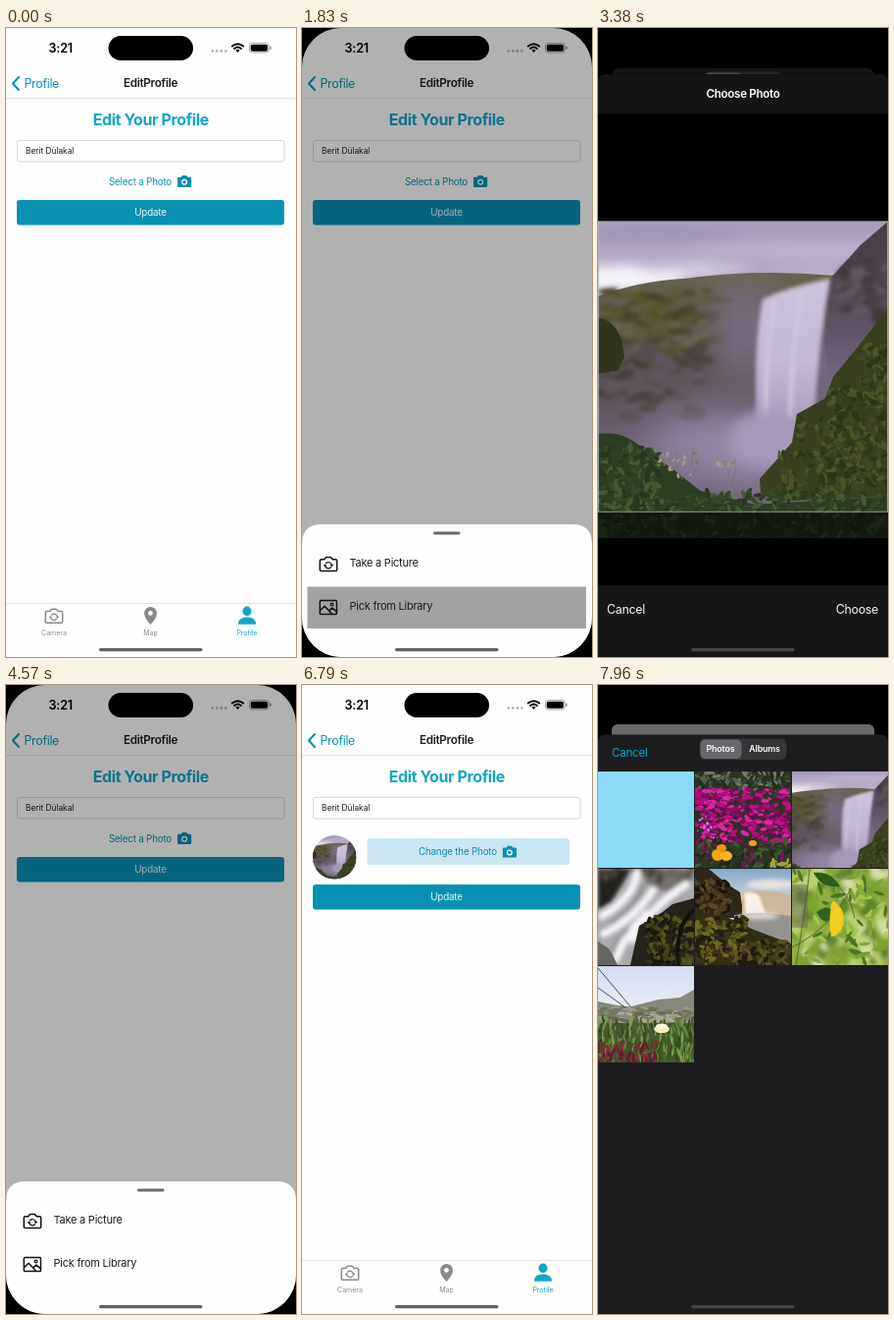
Write an HTML page that moves like this. It is 296 px wide and 640 px high and loops after 8 s.

```html
<!DOCTYPE html>
<html lang="en">
<head>
<meta charset="utf-8">
<title>Edit profile</title>
<style>
html, body { margin: 0; width: 100%; height: 100%; overflow: hidden; background: #000; }
svg { display: block; }
#stage { width: 100vw; height: 100vh; }
text { font-family: Inter, Roboto, sans-serif; white-space: pre; }
</style>
</head>
<body>
<svg id="stage" viewBox="0 0 296 640"></svg>
<script>
const W = 296, H = 640, LOOP = 8000;
const CYAN = '#0891b2', BRIGHT = '#11a6c6';
const $ = id => document.getElementById(id);

// Drawing helpers
const rect = (x, y, w, h, fill, r = 0, more = '') =>
  `<rect x="${x}" y="${y}" width="${w}" height="${h}" rx="${r}" fill="${fill}" ${more}/>`;
const path = (d, fill, more = '') => `<path d="${d}" fill="${fill}" ${more}/>`;
const line = (d, stroke, w = 1) =>
  path(d, 'none', `stroke="${stroke}" stroke-width="${w}" stroke-linecap="round" stroke-linejoin="round"`);
const oval = (x, y, rx, ry, fill, more = '') =>
  `<ellipse cx="${x}" cy="${y}" rx="${rx}" ry="${ry}" fill="${fill}" ${more}/>`;
const text = (s, x, y, size, fill, { weight = 400, ls = -0.2, anchor = 'start' } = {}) =>
  `<text x="${x}" y="${y}" font-size="${size}" fill="${fill}" font-weight="${weight}" letter-spacing="${ls}" text-anchor="${anchor}">${s}</text>`;
const mid = (s, x, y, size, fill, weight = 400, ls = -0.2) =>
  text(s, x, y, size, fill, { weight, ls, anchor: 'middle' });
const at = (x, y, body) => `<g transform="translate(${x} ${y})">${body}</g>`;
const blur = (n, body) => `<g filter="url(#blur${n})">${body}</g>`;
const blurDef = n => `<filter id="blur${n}" x="-50%" y="-50%" width="200%" height="200%"><feGaussianBlur stdDeviation="${n}"/></filter>`;
const grad = (id, stops) => `<linearGradient id="${id}" x2="0" y2="1">${stops.map((c, i) =>
  `<stop offset="${i / (stops.length - 1)}" stop-color="${c}"/>`).join('')}</linearGradient>`;

// Scattered ellipses from a seed, used for foliage and flowers
function scatter(seed, n, [x, y, w, h], colors, rx, ry, tilt = 180) {
  let s = seed;
  const rnd = () => (s = (s * 16807) % 2147483647) / 2147483647;
  rnd();
  let out = '';
  for (let i = 0; i < n; i++) {
    const px = (x + rnd() * w).toFixed(1), py = (y + rnd() * h).toFixed(1), k = 0.5 + rnd() * 0.8;
    const turn = `transform="rotate(${((rnd() - 0.5) * tilt).toFixed(0)} ${px} ${py})"`;
    out += oval(px, py, (rx * k).toFixed(1), (ry * k).toFixed(1), colors[i % colors.length], turn);
  }
  return out;
}

// Icons
const camera = (x, y, fill) => at(x, y,
  path('M1.2 2H3.8L5 .3H9.2L10.4 2H13a1.2 1.2 0 0 1 1.2 1.2V11a1.2 1.2 0 0 1-1.2 1.2H1.2A1.2 1.2 0 0 1 0 11V3.2A1.2 1.2 0 0 1 1.2 2z', fill) +
  oval(7.1, 7, 3, 3, '#fff') + oval(7.1, 7, 1.7, 1.7, fill));
const flipCamera = (x, y, c) => at(x, y,
  line('M2.2 3H5.2L6.6 1.2Q7 .8 7.6 .8H11.4Q12 .8 12.4 1.2L13.8 3H16.8Q18.2 3 18.2 4.4V13.4Q18.2 14.8 16.8 14.8H2.2Q.8 14.8 .8 13.4V4.4Q.8 3 2.2 3z', c, 1.5) +
  line('M7 6.8A3.6 3.6 0 0 1 13 8.6M12 11A3.6 3.6 0 0 1 6 9.2', c, 1.3) +
  path('M11.2 8.2H14.8L13 10.4zM4.2 9.6H7.8L6 7.4z', c));
const imageIcon = (x, y, c) => at(x, y,
  line('M2 .8H16.8Q18 .8 18 2V13.6Q18 14.8 16.8 14.8H2Q.8 14.8 .8 13.6V2Q.8 .8 2 .8zM1 10.8L5.6 6.4L13.2 14.4M10 11L13.4 8.4L17.8 12', c, 1.5) +
  `<circle cx="13" cy="4.8" r="1.4" fill="none" stroke="${c}" stroke-width="1.2"/>`);

// Photos
const moss = ['#3d4522', '#2c351a', '#4b5429', '#353c1f'];
const grass = ['#34482a', '#263620', '#425a33', '#2d4024'];
const fall = rect(0, 0, 296, 322, 'url(#sky)') +
  blur(6, oval(60, 14, 90, 6, '#9f93b3') + oval(200, 30, 110, 7, '#beb2cd') +
    oval(25, 58, 62, 13, '#f6f4fa') + oval(100, 50, 60, 6, '#ded7e8')) +
  path('M0 76Q40 61 90 58Q160 48 240 55L296 90V322H0z', 'url(#hill)') +
  blur(2, scatter(5, 150, [0, 70, 130, 75], ['#57572f', '#45442b', '#62583f', '#4d4336', '#6b6350'], 10, 3, 50) +
    scatter(7, 60, [0, 130, 110, 70], ['#4a4340', '#57504f', '#433f37', '#5f5560'], 10, 4, 50)) +
  blur(20, oval(150, 110, 30, 50, '#80708a') + oval(120, 226, 75, 32, '#9384a2') + oval(165, 235, 50, 30, '#9c8cae') +
    oval(240, 150, 25, 50, '#7f6f8c')) +
  path('M237 58L268 24L296 0V105L262 132L236 160Q226 110 237 58z', 'url(#slope)') +
  blur(2, scatter(9, 45, [246, 40, 50, 60], ['#4c4147', '#62555f', '#413a3b'], 8, 3, 80) +
    path('M168 79Q196 66 237 58Q226 120 222 185L210 220Q185 240 162 214Q158 130 168 79z', 'url(#water)') +
    line('M180 84Q171 140 171 200M208 72Q198 130 196 200', '#d5cbe1', 3)) +
  blur(6, oval(172, 222, 38, 28, '#a797b8')) +
  path('M296 88L265 128L240 158L232 180L203 196L198 225L165 262L166 276L180 285L296 280z', '#38401f') +
  scatter(11, 260, [236, 170, 60, 100], moss, 5, 2.4) +
  scatter(12, 70, [266, 125, 30, 60], moss, 5, 2.4) +
  scatter(13, 110, [184, 235, 70, 45], moss, 5, 2.4) +
  scatter(14, 50, [206, 200, 40, 35], moss, 4, 2) +
  path('M0 98Q24 102 27 138L20 152L0 155z', '#2f3320') +
  path('M0 216Q30 212 50 236L74 250L104 274L160 288L296 280V322H0z', '#2d3d24') +
  scatter(17, 280, [0, 230, 62, 92], grass, 5, 2.2) +
  scatter(19, 300, [66, 276, 230, 46], grass, 5, 2) +
  line('M138 282L132 248M136 270L141 250M95 250L97 230M86 262L78 243', '#7d7567', 0.9) +
  scatter(23, 18, [122, 241, 22, 9], ['#a3958f', '#8d8078'], 2.4, 1.2) +
  scatter(29, 22, [62, 234, 40, 26], ['#a39a80', '#7f7a5c'], 2.2, 1.3);

const tiles = [
  rect(0, 0, 98, 98, '#8bdbf7'),

  rect(0, 0, 98, 98, '#2a3524') +
  scatter(31, 130, [0, 0, 98, 22], ['#56624f', '#38452f', '#737d6c', '#222d1c'], 4, 1.4) +
  scatter(37, 380, [1, 18, 96, 54], ['#c20f88', '#d92aa0', '#8c0a62', '#b00d7b', '#5a1546'], 3.6, 1.8, 60) +
  scatter(41, 150, [0, 70, 98, 28], ['#2b4424', '#7a1459', '#1d2a18', '#405a30'], 4, 1.4) +
  scatter(43, 14, [2, 46, 22, 22], ['#c77be0'], 1.6, 1.2) +
  oval(23, 85, 6, 6, '#f6a50b') + oval(32, 86, 6, 5, '#fbb417') + oval(27, 78, 5, 4, '#f2960a') +
  oval(59, 73, 4, 3, '#f5a211') + scatter(47, 10, [74, 91, 22, 7], ['#9aa93b'], 4, 1.4),

  `<svg width="98" height="98" viewBox="45 14 225 225"><use href="#fall"/></svg>`,

  rect(0, 0, 98, 98, '#a9a8ac') +
  blur(2, path('M0 0H34L22 20L14 34L0 42z', '#24221f') + path('M44 0H98V10L70 24L50 16z', '#77736f') +
    scatter(53, 22, [0, 0, 98, 12], ['#3d3833', '#6b645c'], 7, 3) +
    line('M40 4Q36 30 4 48M56 22Q38 50 6 66M90 16Q52 40 36 72M18 92Q28 66 50 46', '#f4f3f7', 8) +
    line('M46 18Q38 40 14 54M30 62Q16 74 14 90', '#85848a', 3)) +
  path('M98 30L76 36L66 44L42 58L33 98H98z', '#25231a') + path('M0 74L12 82L20 98H0z', '#66645f') +
  scatter(59, 150, [48, 48, 50, 50], ['#43431b', '#191811', '#58511f', '#2d2617'], 4.5, 2.2) +
  line('M98 42Q78 58 82 98', '#14120e', 4),

  rect(0, 0, 98, 98, 'url(#dusk)') + blur(2, oval(78, 16, 26, 5, '#e6e4e2')) +
  path('M0 0H14L32 15L46 24L50 50H0z', '#2f2619') +
  scatter(61, 70, [0, 12, 34, 34], ['#48391f', '#1b150d', '#594626'], 4, 2) +
  path('M48 24Q72 19 98 27V50H48z', '#cdb79d') +
  blur(1, path('M50 25Q58 22 65 27L73 48H52z', '#f7f1ea')) +
  path('M40 47Q70 43 98 48V78H40z', '#93928f') + blur(2, oval(66, 48, 20, 3, '#e5dfda')) +
  path('M0 44L30 48L60 62L98 76V98H0z', '#302d16') +
  scatter(67, 200, [0, 50, 52, 48], ['#55561c', '#221d10', '#6f6a1f', '#3d3217'], 4, 2) +
  scatter(71, 110, [46, 72, 52, 26], ['#463d1d', '#1e1a10', '#5b5120'], 4, 2),

  rect(0, 0, 98, 98, '#8fae40') +
  blur(2, scatter(73, 80, [0, 0, 98, 98], ['#b9d070', '#7fa233', '#d6e0a6', '#5f8529'], 10, 6)) +
  scatter(79, 75, [0, 0, 98, 98], ['#4d7525', '#a4c64a', '#7aa132', '#86a93f'], 7, 2) +
  rect(0, 16, 16, 44, '#6c6a5c', 0, 'opacity=".5"') +
  line('M18 0Q14 40 4 98M36 10Q60 22 64 50M0 80Q40 60 60 20', '#4a5a24', 0.8) +
  path('M22 4Q40 2 49 18Q30 20 22 4z', '#2f5a1d') + path('M25 44Q38 34 44 46Q34 62 25 44z', '#33611f') +
  path('M42 32Q56 42 52 58Q48 68 40 69Q36 48 42 32z', '#f0cd1c'),

  rect(0, 0, 98, 98, 'url(#haze)') +
  path('M0 36L30 42L62 34L84 32L98 24V98H0z', '#86887a') +
  scatter(83, 130, [0, 42, 98, 18], ['#9a9a88', '#666c56', '#adaa9c', '#757862'], 5, 1.6, 30) +
  line('M0 2L33 41M0 22L28 42', '#3a3f42', 0.9) +
  rect(0, 58, 98, 40, '#43592a') +
  scatter(89, 230, [0, 56, 98, 42], ['#63863a', '#344a22', '#7d9c4c', '#475f2c'], 1.1, 6, 40) +
  scatter(97, 110, [0, 78, 62, 20], ['#86283a', '#5f2030', '#4c4f28'], 1.3, 4, 60) +
  oval(65, 64, 8, 4, '#f4f0b4') + oval(65, 61, 6, 2.5, '#fbf8d6')
];

const pic = (x, y, s, box) => `<svg x="${x}" y="${y}" width="${s}" height="${s}" viewBox="${box}"><use href="#fall"/></svg>`;

const updateButton = rect(11, 0, 273, 25.5, CYAN, 3) + mid('Update', 147.5, 16.3, 9.8, '#e9f7fa');

const page = rect(0, 0, W, H, '#fefefe') +
  line('M13 50L7 56.5L13 63', CYAN, 2) +
  text('Profile', 18.5, 60.8, 12.4, CYAN, { ls: -0.3 }) +
  mid('EditProfile', 147.5, 60.4, 11.7, '#1c1c1e', 600, -0.28) +
  rect(0, 71, W, 0.8, '#dcdcdc') +
  mid('Edit Your Profile', 147.8, 98.8, 16, BRIGHT, 700, -0.4) +
  rect(11.4, 114.4, 272.6, 21.6, '#fff', 2.5, 'stroke="#d0d0d2" stroke-width=".9"') +
  text('Berit Dülakal', 20, 128.4, 8.3, '#1a1a1a', { ls: 0 }) +
  `<g id="before">${text('Select a Photo', 105, 159.6, 9.8, CYAN)}${camera(175, 149.8, CYAN)}${at(0, 175, updateButton)}</g>` +
  `<g id="after">${rect(66.5, 156, 206.5, 27, '#cae7f1', 3, 'id="press"')}` +
  `<g clip-path="url(#round)">${pic(11, 153, 44.5, '0 0 296 296')}</g>` +
  `${text('Change the Photo', 119, 173.2, 9.8, CYAN)}${camera(204.8, 163.4, CYAN)}${at(0, 203, updateButton)}</g>` +
  rect(0, 585, W, 0.8, '#dedee0') +
  flipCamera(39.5, 590.5, '#8a8a8e') + mid('Camera', 49, 617.5, 7, '#8a8a8e', 400, 0) +
  path('M147.5 589a6.4 6.4 0 0 1 6.4 6.4C153.9 600.5 149 605 147.5 607C146 605 141.1 600.5 141.1 595.4A6.4 6.4 0 0 1 147.5 589zM147.5 593a2.4 2.4 0 1 0 .01 0z', '#8a8a8e', 'fill-rule="evenodd"') +
  mid('Map', 147.5, 617.5, 7, '#8a8a8e', 400, 0) +
  oval(246, 593.4, 4.5, 4.8, BRIGHT) + path('M237 606.8Q237 599.6 246 599.6T255 606.8z', BRIGHT) +
  mid('Profile', 246, 617.5, 7, BRIGHT, 400, 0);

const menu = path('M0 525Q0 505 20 505H276Q296 505 296 525V640H0z', '#fefefe') +
  rect(134, 512.6, 27.5, 2.8, '#6b6b6b', 1.4) +
  rect(5.5, 568.5, 284.5, 42.5, '#a2a2a2', 0, 'id="hot"') +
  flipCamera(17.5, 537.8, '#111') + text('Take a Picture', 48.5, 547.6, 11, '#1c1c1e', { ls: -0.24 }) +
  imageIcon(17.5, 581.8, '#111') + text('Pick from Library', 48.5, 591.8, 11, '#1c1c1e', { ls: -0.24 });

const sheet = h => `M0 ${h}V8Q0 0 8 0H288Q296 0 296 8V${h}z`;

const picker = path(sheet(660), '#1d1d1f') +
  text('Cancel', 14, 22.8, 11.6, '#0aa5cb', { ls: -0.25 }) +
  rect(103.5, 4, 89, 21.6, '#363639', 6) + rect(104.5, 5, 42, 19.6, '#68686c', 5) +
  mid('Photos', 125, 17.9, 8.8, '#fff', 600, -0.1) + mid('Albums', 170, 17.9, 8.8, '#fff', 600, -0.1) +
  tiles.map((art, i) => `<svg x="${i % 3 * 99}" y="${37.6 + (i / 3 | 0) * 99}" width="98" height="98">${art}</svg>`).join('');

const crop = path(sheet(593), '#000') + path(sheet(40), '#151516') +
  mid('Choose Photo', 148, 24, 11.6, '#fff', 600, -0.3) +
  `<svg y="149.500" width="296" height="322"><use href="#fall"/></svg>` +
  rect(0, 445, W, 27, '#000', 0, 'opacity=".58"') +
  rect(0.5, 149.5, 295, 295.5, 'none', 0, 'stroke="#b9b9bd" stroke-width="1" stroke-opacity=".75"') +
  rect(0, 519.5, W, 74, '#171718') +
  text('Cancel', 9, 548.6, 12.4, '#f4f4f4', { ls: -0.3 }) +
  text('Choose', 286, 548.6, 12.4, '#f4f4f4', { ls: -0.3, anchor: 'end' });

const status = rect(104.5, 8, 86.5, 25, '#000', 12.5) +
  text('3:21', 43.5, 24.6, 12.6, '#000', { weight: 600 }) +
  [211, 215.5, 220, 224.5].map(x => oval(x - 0.2, 23.4, 1.4, 1.4, '#000', 'opacity=".28"')).join('') +
  line('M230.8 18.6Q236.5 13.8 242.2 18.6M233 21Q236.5 18 240 21', '#000', 1.9) +
  path('M234.4 22.6Q236.5 21 238.6 22.6L236.5 25z', '#000') +
  rect(248.4, 15.4, 20, 9.6, 'none', 3, 'stroke="#000" stroke-opacity=".4" stroke-width=".9"') +
  rect(249.7, 16.7, 17.4, 7, '#000', 2) + rect(269.4, 18.6, 1.3, 3.2, '#000', 0.6, 'opacity=".45"');

$('stage').innerHTML = `<defs>
  ${grad('sky', ['#a89bba', '#c4b8d2', '#c8bed6', '#a99abc', '#8f7fa5'])}
  ${grad('hill', ['#68634d', '#58504c', '#61555f', '#75677f', '#5a5562'])}
  ${grad('slope', ['#453d44', '#564a58', '#73647f'])}
  ${grad('water', ['#cec4dc', '#c3b7d3', '#a494b6'])}
  ${grad('dusk', ['#86a8c8', '#cfd3d8', '#d0c8c0', '#a2a3a4'])}
  ${grad('haze', ['#d3dcf0', '#eceef4', '#eceef4'])}
  ${[1, 2, 6, 20].map(blurDef).join('')}
  <clipPath id="round"><circle cx="33.2" cy="175.2" r="22.2"/></clipPath>
  <clipPath id="frame"><rect id="frameBox" width="${W}" height="${H}"/></clipPath>
  <svg id="fall" width="296" height="322">${fall}</svg></defs>` +
  rect(0, 0, W, H, '#000') +
  `<g id="root"><g clip-path="url(#frame)">${page}${rect(0, 0, W, H, '#000', 0, 'id="shade"')}
    <g id="menu">${menu}</g>${rect(0, 0, W, H, '#000', 0, 'id="dim"')}</g></g>
  <g id="picker">${picker}${path(sheet(660), '#000', 'id="pickerDim"')}</g>
  <g id="crop">${crop}</g>${status}${rect(95, 631, 105.5, 3.2, '#606062', 1.6, 'id="home"')}`;

// Timing helpers
const steps = (t, a, b, n) => t < a ? 0 : Math.min(1, (Math.floor((t - a) / (b - a) * (n - 1) + 1e-6) + 1) / n);
const ease = q => (1 - Math.cos(Math.PI * q)) / 2;
const spring = (q, k) => 1 - (1 + k * q) * Math.exp(-k * q);
const set = (id, name, v) => $(id).setAttribute(name, v);
const show = (id, on) => set(id, 'visibility', on ? 'visible' : 'hidden');
const within = (t, a, b) => t >= a && t < b;

function render(t) {
  const again = t >= 4680;
  const open = again
    ? t < 6000 ? 1 - ease(steps(t, 4680, 5010, 7)) : ease(steps(t, 6930, 7290, 8))
    : ease(steps(t, 960, 1340, 8));
  const pick = again ? spring(steps(t, 7745, 7960, 5), 9.5) : spring(steps(t, 2150, 2300, 4), 5.8);
  const cropIn = again ? 0 : spring(steps(t, 2920, 3180, 6), 10);
  const leave = again || t >= 4570 ? 1 : spring(steps(t, 4320, 4570, 6), 7);
  const card = again ? pick : pick * (1 - leave);

  show('before', !again);
  show('after', again);
  show('press', within(t, 6790, 6930));
  show('hot', within(t, 1830, 1910) || within(t, 7640, 7692));

  set('shade', 'opacity', 0.305 * open);
  set('menu', 'transform', `translate(0 ${135 * (1 - open)})`);
  show('menu', open > 0);
  const sunk = leave ? 0 : cropIn;
  const scale = 1 - 0.093 * card - 0.06 * sunk;
  set('root', 'transform', `translate(${W * (1 - scale) / 2} ${40 * card + 6 * sunk}) scale(${scale})`);
  set('frameBox', 'rx', open > 0 ? 40 - 32 * card : 0);
  set('dim', 'opacity', 0.4 * card);

  const s = 1 - 0.1 * cropIn, top = 50 + 590 * (1 - pick);
  show('picker', pick > 0 && (again || t < 4320));
  set('picker', 'transform', `translate(${W * (1 - s) / 2} ${top + (41 - top) * cropIn}) scale(${s})`);
  set('pickerDim', 'opacity', 0.3 * cropIn);

  show('crop', cropIn > 0 && leave < 1);
  set('crop', 'transform', `translate(0 ${47 + 593 * (1 - cropIn * (1 - leave))})`);
  set('home', 'fill', card > 0.1 ? '#454547' : '#606062');
}

const start = performance.now();
function tick() {
  render((performance.now() - start) % LOOP);
  requestAnimationFrame(tick);
}
render(0);
tick();
</script>
</body>
</html>
```
